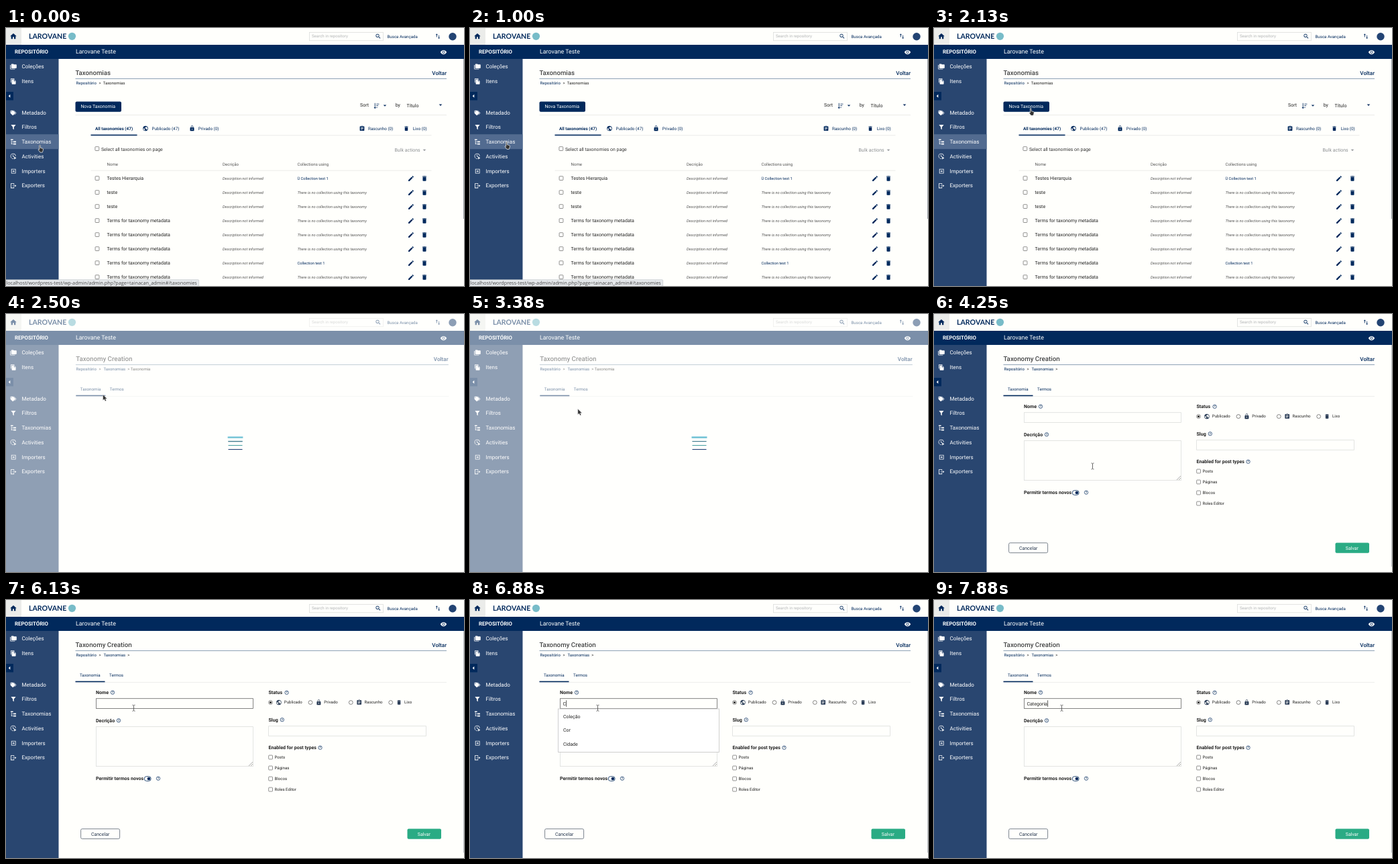
An HTML page for the animation above (8000 ms loop, 683 by 384 pixels).

```html
<!DOCTYPE html>
<html lang="pt">
<head>
<meta charset="utf-8">
<title>Taxonomias</title>
<style>
html, body { margin: 0; width: 100%; height: 100%; overflow: hidden; background: #fffffc; }
svg { display: block; width: 683px; height: 384px; font-family: Roboto, sans-serif; }
text { white-space: pre; text-rendering: geometricPrecision; }
</style>
</head>
<body>
<svg id="stage" viewBox="0 0 683 384"></svg>
<script>
const NAVY = '#01295c', SIDE = '#294670', PAGE = '#fffffc';
const INK = '#222', HEAD = '#454647', GREY = '#555', LINE = '#dcdedc', PALE = '#e6e7e5';
const LOOP = 8000, TICK = 125;

const ICONS = {
  home: 'M10 20v-6h4v6h5v-8h3L12 3 2 12h3v8z',
  search: 'M15.5 14h-.79l-.28-.27A6.47 6.47 0 0 0 16 9.5 6.5 6.5 0 1 0 9.5 16c1.61 0 3.09-.59 4.23-1.57l.27.28v.79l5 4.99L20.49 19zm-6 0C7 14 5 12 5 9.5S7 5 9.5 5 14 7 14 9.5 12 14 9.5 14z',
  updown: 'M8 3l4 4H9v8H7V7H4zM15 9h2v8h3l-4 4-4-4h3z',
  eye: 'M12 4.5C7 4.5 2.73 7.61 1 12c1.73 4.39 6 7.5 11 7.5s9.27-3.11 11-7.5c-1.73-4.39-6-7.5-11-7.5zM12 17a5 5 0 1 1 0-10 5 5 0 0 1 0 10zm0-8a3 3 0 1 0 0 6 3 3 0 0 0 0-6z',
  folders: 'M2 6H0v14a2 2 0 0 0 2 2h16v-2H2zM22 4h-8l-2-2H6a2 2 0 0 0-2 2v12a2 2 0 0 0 2 2h16a2 2 0 0 0 2-2V6a2 2 0 0 0-2-2z',
  files: 'M16 1H4a2 2 0 0 0-2 2v14h2V3h12zM15 5H8a2 2 0 0 0-2 2v14a2 2 0 0 0 2 2h11a2 2 0 0 0 2-2V11zM14 12V6.5l5.5 5.5z',
  tag: 'M18.4 11.6l-7-7A2 2 0 0 0 10 4H3a2 2 0 0 0-2 2v7c0 .55.22 1.05.59 1.42l7 7a2 2 0 0 0 2.82 0l7-7a2 2 0 0 0 0-2.82zM4.5 9a1.5 1.5 0 1 1 0-3 1.5 1.5 0 0 1 0 3zM14 4l8.4 7.8q1.2 1.2 0 2.6l-6 6-1-1 6-6.2L12.500 4z',
  filter: 'M3 3h18l-7 9v9l-4-3v-6z',
  tree: 'M2 2h9v4H2zM12 10h10v4H12zM12 18h10v4H12zM4 7h2v12h5v2H4zM7 11h4v2H7z',
  clock: 'M11 1a10 10 0 1 0 2 19.800l-.5-2A8 8 0 1 1 19 11h2A10 10 0 0 0 11 1zM10 6h2v5l3.500 2-1 1.700-4.500-2.700zM15 13l8 5-8 5z',
  enter: 'M4 4h17v17H4zM6 6v13h13V6zM8 11.500h4V8.500l4.500 4-4.500 4v-3H8z',
  leave: 'M2 3h13v5h-2V5H4v14h9v-3h2v5H2zM9 11h9V8l5 4-5 4v-3H9z',
  globe: 'M12 2a10 10 0 1 0 0 20 10 10 0 0 0 0-20zm-1 17.93A8 8 0 0 1 4.21 10.21L9 15v1a2 2 0 0 0 2 2zm6.9-2.54A2 2 0 0 0 16 16h-1v-3a1 1 0 0 0-1-1H8v-2h2a1 1 0 0 0 1-1V7h2a2 2 0 0 0 2-2v-.41a8 8 0 0 1 2.9 12.8z',
  lock: 'M18 8h-1V6A5 5 0 0 0 7 6v2H6c-1.1 0-2 .9-2 2v10c0 1.1.9 2 2 2h12c1.1 0 2-.9 2-2V10c0-1.1-.9-2-2-2zm-6 9a2 2 0 1 1 0-4 2 2 0 0 1 0 4zM15.1 8H8.9V6a3.1 3.1 0 0 1 6.2 0z',
  note: 'M19 3h-4.18a3 3 0 0 0-5.64 0H5c-1.1 0-2 .9-2 2v14c0 1.1.9 2 2 2h14c1.1 0 2-.9 2-2V5c0-1.1-.9-2-2-2zm-7 0a1 1 0 1 1 0 2 1 1 0 0 1 0-2zm2 14H7v-2h7zm3-4H7v-2h10zm0-4H7V7h10z',
  trash: 'M6 19c0 1.1.9 2 2 2h8c1.1 0 2-.9 2-2V7H6zM19 4h-3.5l-1-1h-5l-1 1H5v2h14z',
  pencil: 'M3 17.25V21h3.75L17.81 9.94l-3.75-3.75zM20.71 7.04a1 1 0 0 0 0-1.41l-2.34-2.34a1 1 0 0 0-1.41 0l-1.83 1.83 3.75 3.75z',
  sort: 'M6 2h2v15h3l-4 5-4-5h3zM12 4h10v2H12zM12 10h7v2h-7zM12 16h4v2h-4z'
};

// Text is placed by its left edge and the middle of its letters.
const text = (x, y, s, size, fill = INK, more = '') =>
  `<text x="${x}" y="${(y + size * 0.31).toFixed(2)}" font-size="${size}" fill="${fill}" ${more}>${s}</text>`;
const rect = (x, y, w, h, fill, more = '') =>
  `<rect x="${x}" y="${y}" width="${w}" height="${h}" fill="${fill}" ${more}/>`;
const box = (x, y, w, h, stroke, more = '') =>
  rect(x, y, w, h, PAGE, `stroke="${stroke}" stroke-width=".8" ${more}`);
const path = (d, fill, more = '') => `<path d="${d}" fill="${fill}" ${more}/>`;
const icon = (name, x, y, size, fill = NAVY) =>
  path(ICONS[name], fill, `fill-rule="evenodd" transform="translate(${x - size / 2} ${y - size / 2}) scale(${size / 24})"`);
const circle = (x, y, r, fill, more = '') => `<circle cx="${x}" cy="${y}" r="${r}" fill="${fill}" ${more}/>`;
const check = (x, y) => box(x - 2.9, y - 2.9, 5.8, 5.8, '#777', 'rx=".8"');
const caretDown = (x, y, fill = NAVY) => path(`M${x - 2.3} ${y - 1.1}h4.6l-2.3 2.4z`, fill);
const group = (id, body) => `<g id="${id}">${body}</g>`;
const MED = 'font-weight="500"';
const END = 'font-weight="500" text-anchor="end"';

function help(x, y) {
  return circle(x, y, 2.7, 'none', `stroke="${NAVY}" stroke-width=".7"`) +
    text(x, y + .1, '?', 4.4, NAVY, 'text-anchor="middle" font-weight="500"');
}

function frame() {
  const menu = [['folders', 'Coleções', 57.5], ['files', 'Itens', 79.3], ['tag', 'Metadado', 126],
    ['filter', 'Filtros', 147.6], ['tree', 'Taxonomias', 169.4], ['clock', 'Activities', 191.2],
    ['enter', 'Importers', 213], ['leave', 'Exporters', 234.8]];
  return rect(0, 0, 683, 384, PAGE) +
    rect(0, 0, 23, 25, '#ebecea') + icon('home', 11, 12.3, 11.5) +
    text(34, 12.5, 'LAROVANE', 10.6, NAVY, 'font-family="Lato, sans-serif" font-weight="700"') +
    circle(98.5, 12.3, 5.6, '#78bcc8') +
    box(452.4, 6.4, 110, 12.4, LINE) +
    text(456, 12.6, 'Search in repository', 6.1, '#b4b6b8') + icon('search', 555, 12.3, 9.5) +
    text(568.5, 12.6, 'Busca Avançada', 6.15, NAVY) +
    icon('updown', 644, 12.3, 10) + circle(666, 12.7, 5.7, '#234473') +
    rect(0, 25, 683, 21, NAVY) + rect(0, 46, 78.5, 338, SIDE) +
    text(13, 35.7, 'REPOSITÓRIO', 7.9, '#fff', 'font-weight="700"') +
    text(104, 35.7, 'Larovane Teste', 8.9, '#fff') + icon('eye', 652.5, 36, 10, '#fff') +
    rect(0, 95, 11, 12.5, NAVY) + path('M6.3 98.8v5l-2.6-2.5z', '#fff') +
    group('active', rect(0, 158.2, 78.5, 22, '#526b90')) +
    menu.map(([i, s, y]) => icon(i, 11, y, 9.6, '#fff') + text(23.5, y, s, 8.05, '#fff')).join('');
}

function listPage() {
  let rows = '';
  const names = ['Testes Hierarquia', 'teste', 'teste'];
  const uses = { 0: 'Ü Collection test 1', 6: 'Collection test 1' };
  for (let i = 0; i < 8; i++) {
    const y = 224 + i * 21;
    rows += check(136, y - .4) + text(150.5, y, names[i] || 'Terms for taxonomy metadata', 7) +
      text(323, y, 'Description not informed', 5.7, GREY, 'font-style="italic"') +
      (uses[i] ? text(434.5, y, uses[i], 5.7, NAVY)
        : text(434.5, y, 'There is no collection using this taxonomy', 5.7, GREY, 'font-style="italic"')) +
      icon('pencil', 604, y, 10.5) + icon('trash', 624, y, 10.2);
  }
  return text(103.5, 66.6, 'Taxonomias', 9.7, HEAD, MED) +
    text(657, 67.6, 'Voltar', 8.1, NAVY, END) + rect(103.5, 75, 553.5, .9, '#8298ae') +
    text(104.5, 82.5, 'Repositório', 6, NAVY) + text(138.5, 82.5, '&gt;', 6) +
    text(144.7, 82.5, 'Taxonomias', 6) +
    rect(103.5, 109.4, 68.5, 15.4, NAVY, 'rx="2"') + text(111.4, 117.2, 'Nova Taxonomia', 6.95, '#fff') +
    text(528, 115.3, 'Sort', 7) + icon('sort', 552.3, 116, 10) + caretDown(565, 115.5) +
    text(580.7, 115.3, 'by', 7) + text(597.5, 115.5, 'Título', 7.1) + caretDown(648, 114.7) +
    rect(103.5, 129, 553.5, .8, PALE) +
    rect(126.5, 159.4, 508, .8, PALE) + rect(126.5, 158.6, 69, 1.6, NAVY) +
    text(133, 149.8, 'All taxonomies (47)', 6.4, NAVY, 'font-weight="700"') +
    icon('globe', 208, 149.6, 9) + text(217.5, 149.8, 'Publicado (47)', 6.3, NAVY) +
    icon('lock', 277.5, 149.4, 9) + text(286.8, 149.8, 'Privado (0)', 6.3, NAVY) +
    icon('note', 531, 149.5, 9) + text(540, 149.8, 'Rascunho (0)', 6.3, NAVY) +
    icon('trash', 597, 149.5, 9) + text(606.7, 149.8, 'Lixo (0)', 6.3, NAVY) +
    check(135.8, 179.6) + text(142, 180.4, 'Select all taxonomies on page', 6.9, '#333') +
    text(579.5, 181.7, 'Bulk actions', 7, '#8c8f92') + caretDown(624, 181.8, '#8c8f92') +
    text(150.5, 203.5, 'Nome', 6.2, GREY) + text(323, 203.5, 'Decrição', 6.1, GREY) +
    text(434.5, 203.5, 'Collections using', 6.1, GREY) + rect(126.5, 211.7, 508, .8, PALE) +
    rows + rect(682, 46, 1, 238, '#9aa0a6');
}

function createHead(dx, right, crumbs) {
  return text(103.5 + dx, 66.6, 'Taxonomy Creation', 9.75, HEAD, MED) +
    text(right, 67.6, 'Voltar', 8.1, NAVY, END) +
    rect(103.5 + dx / 2, 75, right - 103.5, .9, '#8298ae') +
    text(104.5, 82.5, 'Repositório', 6, NAVY) + text(138.5, 82.5, '&gt;', 6) +
    text(145.5, 82.5, 'Taxonomias', 6, NAVY) + text(181.3, 82.5, crumbs, 6) +
    text(110 + dx, 112.5, 'Taxonomia', 6.2, NAVY) + text(154 + dx, 112.5, 'Termos', 6.2, NAVY) +
    rect(103.5 + dx, 122, right - 103.5, .7, PALE) + rect(103.5 + dx, 120.7, 44, 1.6, NAVY);
}

function formPage() {
  const label = (x, y, s, hx) => text(x, y, s, 7.1, INK, 'font-weight="700"') + help(hx, y - .4);
  const states = [['globe', 'Publicado', 394.5], ['lock', 'Privado', 454], ['note', 'Rascunho', 514.3], ['trash', 'Lixo', 573.7]];
  const types = ['Posts', 'Páginas', 'Blocos', 'Roles Editor'];
  return createHead(0, 657, '&gt;') +
    label(134, 138, 'Nome', 159) + `<g id="field">${box(134.4, 146.7, 234.2, 14.8, LINE)}</g>` +
    label(134, 179.7, 'Decrição', 168) + box(134.4, 188.6, 234.2, 59, LINE) +
    path('M362 247l6-6M365 247l3-3', 'none', 'stroke="#888" stroke-width=".7"') +
    label(134, 266, 'Permitir termos novos', 227) +
    box(206.2, 262.6, 10, 6.8, NAVY, 'rx="3.4"') + circle(212.9, 266, 2.3, NAVY) +
    label(391.5, 138.2, 'Status', 418.6) +
    states.map(([i, s, x]) => circle(x, 152.5, 2.9, PAGE, 'stroke="#666" stroke-width=".8"') +
      icon(i, x + 12.4, 152.4, 9, '#2c3e57') + text(x + 20.3, 152.3, s, 6.1)).join('') +
    circle(394.5, 152.5, 1.6, '#222') +
    label(391.5, 178.6, 'Slug', 411.8) + box(391.6, 187.7, 234.8, 14.6, LINE) +
    label(391.5, 220.2, 'Enabled for post types', 468.5) +
    types.map((s, i) => check(394.6, 234 + i * 16) + text(400.5, 234.5 + i * 16, s, 6.1)).join('') +
    box(111.6, 340.7, 58, 14.7, '#5a6472', 'rx="2"') + text(126.9, 348.4, 'Cancelar', 7, '#26364f') +
    rect(598.5, 340.4, 50.5, 15.3, '#2aab84', 'rx="2"') + text(613.8, 348.4, 'Salvar', 7, '#fff') +
    rect(682, 46, 1, 330, '#c0c4c8');
}

const suggestions = rect(131.5, 162, 240, 64.5, '#fff', 'stroke="#c4c4c4" stroke-width=".8"') +
  ['Coleção', 'Cor', 'Cidade'].map((s, i) => text(139, 173.5 + i * 20.5, s, 7)).join('');

const POINTERS = {
  hand: path('M-.8.8q.8-1.4 1.6 0v3.6l3.4.9q1 .4.8 1.6l-.6 2.6-.6 1.6h-3.4L-2.4 7.3q-.2-1.2 1.6-.4z',
    '#333', 'stroke="#fff" stroke-width=".7"'),
  arrow: path('M0 0v8.6l2-1.8 1.4 3 1.7-.8-1.5-2.8h2.7z', '#333', 'stroke="#fff" stroke-width=".4"'),
  beam: path('M-2-4.500q1.600 0 2 .8.4-.8 2-.8M0-3.700v7.400M-2 4.500q1.600 0 2-.8.4.8 2 .8', 'none',
    'stroke="#444" stroke-width=".8"')
};

const stage = document.getElementById('stage');
const $ = id => document.getElementById(id);
stage.innerHTML = frame() + group('list', listPage()) +
  group('blank', createHead(.8, 659.5, '&gt; Taxonomia')) + group('form', formPage()) +
  text(138.4, 154.4, '', 7.1, INK, 'id="typed"') +
  rect(138.5, 149.3, .8, 9.6, '#333', 'id="caret"') + group('suggest', suggestions) +
  rect(0, 0, 683, 384, PAGE, 'id="veil"') + group('loader', '') +
  group('status', rect(-1, 374.7, 288.6, 10, '#e6e9ec', 'stroke="#c2c6ca" stroke-width=".7" rx="1"') +
    text(.3, 380.1, 'localhost/wordpress-test/wp-admin/admin.php?page=tainacan_admin#/taxonomies', 7.28, '#444',
      'font-family="Open Sans, sans-serif"')) +
  Object.keys(POINTERS).map(n => group(n, POINTERS[n])).join('');

// Pointer stops: tick, x, y.
const PATH = [[0, 50.5, 174], [7, 54, 170], [9, 55, 168.5], [10, 55, 168.5], [17, 144.2, 119.2], [19, 144.5, 120],
  [25, 144.5, 120], [32, 226.5, 227], [34, 236.5, 226.5], [39, 190.5, 160.8], [64, 190.5, 160.8]];
const WORD = 'Categoria';
const show = (id, on) => $(id).style.display = on ? '' : 'none';

function pointerAt(k) {
  const i = Math.max(1, PATH.findIndex(p => p[0] >= k));
  const [a, ax, ay] = PATH[i - 1], [b, bx, by] = PATH[i];
  const u = (k - a) / (b - a), e = u * u * (3 - 2 * u);
  return [ax + (bx - ax) * e, ay + (by - ay) * e];
}

function lettersAt(k) {
  if (k < 53) return 0;
  if (k < 56) return 1;
  if (k < 58) return 2;
  return k < 63 ? k - 55 : 9;
}

function loaderLines(time) {
  const colors = ['#72c3d6', '#467f92', '#3a9a9c', '#10306a'];
  const phase = (time - 2450) / 904;
  return colors.map((c, i) => {
    const swell = Math.max(0, Math.cos(2 * Math.PI * (phase - i * .22))) ** 2;
    const h = 1 + 1.6 * swell, w = 21 + 2 * swell;
    return rect(342 - w / 2, 183.6 + i * 6 - h / 2, w, h, c);
  }).join('');
}

function draw(now) {
  const k = Math.floor((now % LOOP) / TICK);
  const onForm = k >= 28;
  show('list', k < 19);
  show('active', k < 19);
  show('blank', k >= 19 && !onForm);
  show('form', onForm);

  const veil = k < 19 || k > 33 ? 0 : k === 19 || k === 33 ? .25 : .48;
  $('veil').setAttribute('opacity', veil);
  show('loader', veil > 0);
  $('loader').innerHTML = loaderLines(k * TICK);

  $('status').setAttribute('opacity', Math.max(0, Math.min(1, (15 - k) / 3)));

  $('field').firstChild.setAttribute('stroke', k < 40 ? LINE : k < 42 ? '#999' : '#666');
  const n = lettersAt(k), typed = $('typed');
  typed.textContent = WORD.slice(0, n);
  $('caret').setAttribute('x', 138.4 + (n ? typed.getComputedTextLength() + .3 : 0));
  show('caret', k >= 40 && k < 49 || k >= 53);
  show('suggest', k >= 53 && k < 56);

  const shape = k < 12 || k >= 16 && k < 19 ? 'hand' : k < 33 ? 'arrow' : 'beam';
  const [x, y] = pointerAt(k);
  for (const name in POINTERS) show(name, name === shape);
  $(shape).setAttribute('transform', `translate(${x.toFixed(2)} ${y.toFixed(2)})`);
}

const start = performance.now();
function loop() {
  draw(performance.now() - start);
  requestAnimationFrame(loop);
}
loop();
</script>
</body>
</html>
```
